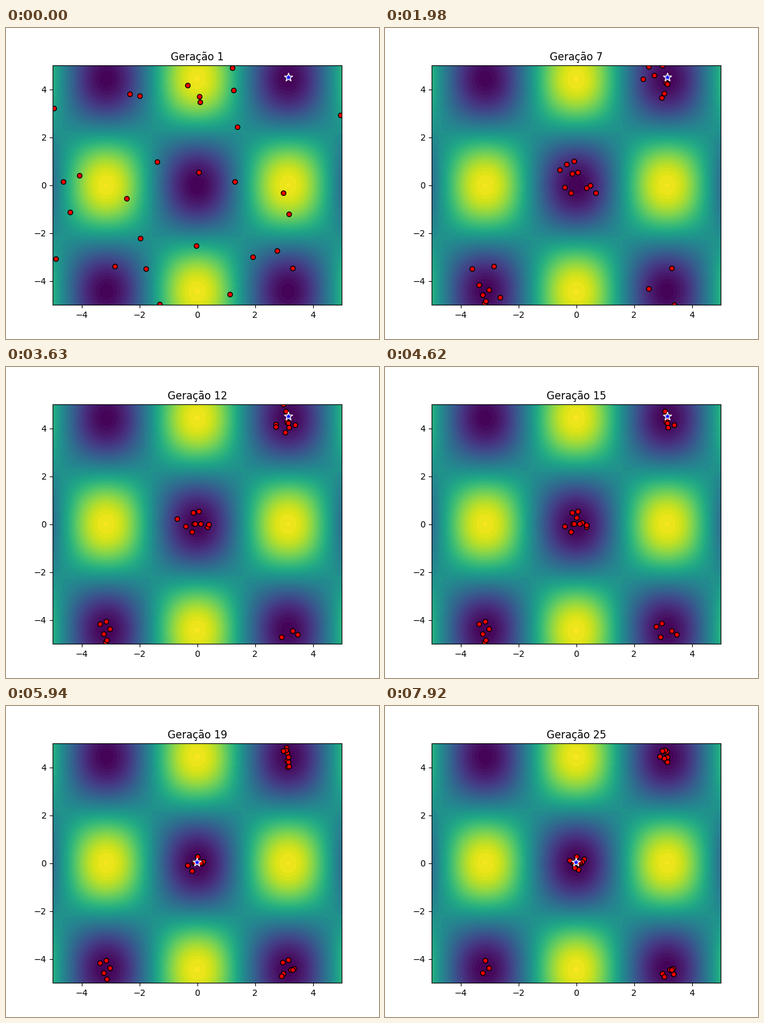
A matplotlib script that plays this animation: 600x500 px, repeating every 8 s.

```python
import numpy as np
import matplotlib.pyplot as plt
from matplotlib.animation import FuncAnimation

LOOP_MS, TICK_MS, GEN_MS = 8000, 20, 330
GENERATIONS, POPULATION, LIMIT = 25, 29, 5

# Minima of the surface and how often offspring settle around each
PX, PY = np.pi, np.pi * np.sqrt(2)
BASINS = np.array([(0, 0), (PX, PY), (PX, -PY), (-PX, -PY), (-PX, PY)])
SHARES = [0.34, 0.30, 0.24, 0.10, 0.02]

# First generation of each best solution, and its place
BEST = [(1, (3.150, 4.506)), (16, (-0.032, 0.143)), (18, (-0.011, 0.039))]


def griewank(x, y):
    return 1 + (x**2 + y**2) / 4000 - np.cos(x) * np.cos(y / np.sqrt(2))


def evolve(seed):
    """Replace the worst individuals by offspring ever closer to the minima."""
    rng = np.random.default_rng(seed)
    pop = rng.uniform(-LIMIT, LIMIT, (POPULATION, 2))
    history = [pop]
    for gen in range(2, GENERATIONS + 1):
        births = round(6.5 - 0.18 * gen)
        spread = 0.9 * np.exp(-gen / 16)
        worst = np.argsort(griewank(*pop.T))[-births:]
        homes = BASINS[rng.choice(len(BASINS), births, p=SHARES)]
        pop = pop.copy()
        pop[worst] = np.clip(rng.normal(homes, spread), -LIMIT, LIMIT)
        history.append(pop)
    return history


def best_at(gen):
    return [place for start, place in BEST if start <= gen][-1]


history = evolve(seed=7)

fig, ax = plt.subplots(figsize=(6, 5), dpi=100)
axis = np.linspace(-LIMIT, LIMIT, 100)
gx, gy = np.meshgrid(axis, axis)
ax.contourf(gx, gy, griewank(gx, gy), levels=50, cmap="viridis")
dots = ax.scatter(*history[0].T, s=30, c="red", edgecolors="black")
star = ax.scatter(*best_at(1), s=100, c="blue", marker="*", edgecolors="white")
ax.set_xlim(-LIMIT, LIMIT)
ax.set_ylim(-LIMIT, LIMIT)
title = ax.set_title("Geração 1")


def update(i):
    gen = (i * TICK_MS + TICK_MS // 2) // GEN_MS + 1
    dots.set_offsets(history[gen - 1])
    star.set_offsets([best_at(gen)])
    title.set_text(f"Geração {gen}")
    return dots, star, title


anim = FuncAnimation(fig, update, frames=LOOP_MS // TICK_MS,
                     interval=TICK_MS, repeat=True, repeat_delay=0)
plt.show()
```
